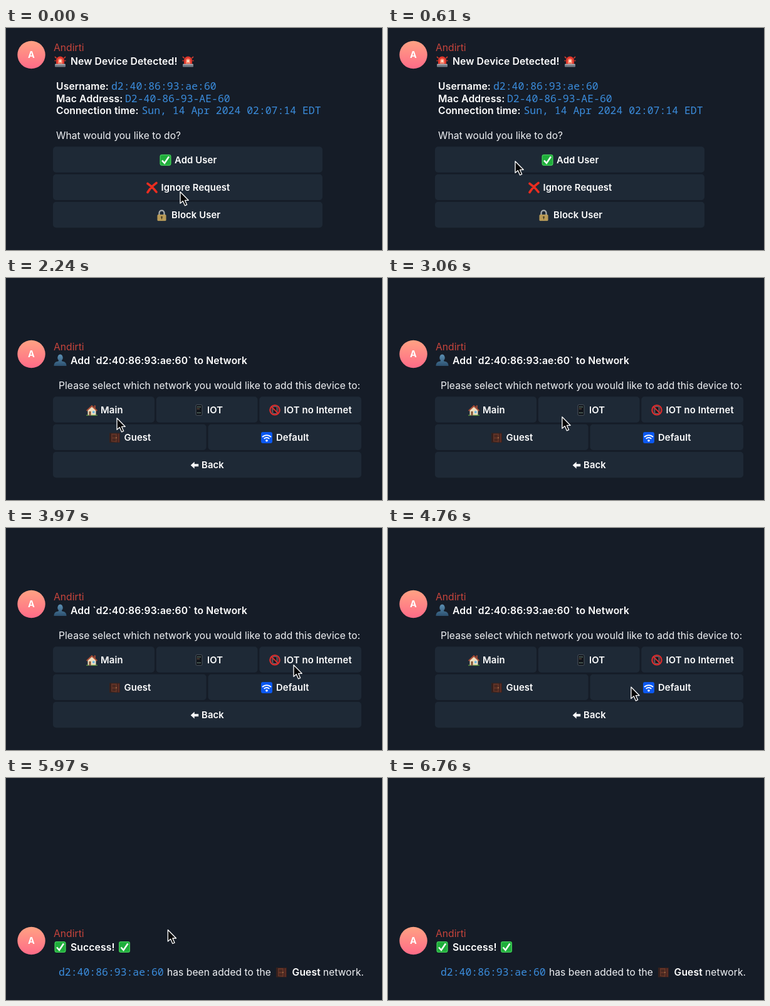
These frames come from a looping animation (600x356 px, 6.79 s). An HTML page:

```html
<!DOCTYPE html>
<html lang="en">
<head>
<meta charset="utf-8">
<title>New device prompt</title>
<style>
  html, body { margin: 0; width: 100%; height: 100%; overflow: hidden; background: #151c27; }
  svg { display: block; width: 100vw; height: 100vh; }
  text { font: 400 15.6px Inter, sans-serif; letter-spacing: .05px; fill: #f1f3f6; }
  .strong { font-weight: 600; font-size: 15.7px; letter-spacing: .13px; fill: #fff; }
  .label { font-weight: 600; font-size: 14.8px; letter-spacing: .13px; fill: #fff; }
  .code { font: 400 16.45px "Noto Sans Mono", monospace; letter-spacing: 0; fill: #3b8ddd; }
  .sender { fill: #c7443c; }
  .initial { font-weight: 700; font-size: 14.5px; fill: #fff; text-anchor: middle; }
</style>
</head>
<body>
<svg id="stage" viewBox="0 0 600 356" xmlns="http://www.w3.org/2000/svg">
  <defs>
    <linearGradient id="skin" x2="0" y2="1">
      <stop offset="0" stop-color="#ffa283"/><stop offset="1" stop-color="#ff6b88"/>
    </linearGradient>
    <linearGradient id="shade" x2="0" y2="1">
      <stop offset="0" stop-color="#5b8fb3"/><stop offset="1" stop-color="#2c506f"/>
    </linearGradient>
    <clipPath id="above"><rect width="600" height="190"/></clipPath>
    <clipPath id="reveal"><rect id="revealBox" y="180" width="600" height="176"/></clipPath>

    <!-- icons on an 18 x 18 grid -->
    <g id="siren">
      <path d="M2.500 14V7.500a6.500 6.500 0 0 1 13 0V14z" fill="#e2372c"/>
      <path d="M5.500 13V8a3.500 3.500 0 0 1 7 0v5z" fill="#ff8a70"/>
      <circle cx="9" cy="8.500" r="1.800" fill="#fff0d8"/>
      <path d="M.5 1.500l2.500 2.500M17.500 1.500l-2.500 2.500M0 8h2M16 8h2" stroke="#d8402f" stroke-width="1.700"/>
      <rect x=".5" y="13" width="17" height="5" rx="1" fill="#737a84"/>
      <path d="M1 14h16" stroke="#b9bec5"/>
    </g>
    <g id="check">
      <rect width="18" height="18" rx="3" fill="#1fae3b"/>
      <rect x=".7" y=".7" width="16.600" height="16.600" rx="2.500" fill="none" stroke="#4fd263"/>
      <path d="M3.500 9.500l4 4.500L14.500 3.500" fill="none" stroke="#fff" stroke-width="2.500"/>
    </g>
    <path id="cross" d="M2 2.500Q10 8 16 16M16 1.500Q7 8 2 16.500" fill="none" stroke="#ea2d20" stroke-width="3.600" stroke-linecap="round"/>
    <g id="lock">
      <path d="M5 9V5.500a4 4 0 0 1 8 0V9" fill="none" stroke="#a8adb0" stroke-width="2.200"/>
      <rect x="2" y="8" width="14" height="10" rx="1.500" fill="#c3a45c"/>
      <path d="M2.500 10.500h13M2.500 13h13M2.500 15.500h13" stroke="#a0834a" stroke-width=".8"/>
      <circle cx="9" cy="12" r="1.300" fill="#433923"/><path d="M9 12v3.500" stroke="#433923" stroke-width="1.200"/>
    </g>
    <g id="house">
      <path d="M2.500 8L9 2.500 15.500 8v9.500h-13z" fill="#efdfc0"/>
      <path d="M12.500 1.500H15v5l-2.500-2z" fill="#924633"/>
      <path d="M0 9.500L9 1l9 8.500-1.200 1.400L9 4 1.200 10.900z" fill="#a94c35"/>
      <path d="M4.500 11h3v6.500h-3z" fill="#81502e"/>
      <path d="M10 10.500h3.500v3.500H10z" fill="#6cb4dd"/>
      <path d="M0 17.300h4M8 17.300h10" stroke="#5d9b3b" stroke-width="1.400"/>
    </g>
    <g id="phone">
      <rect x="4" y=".5" width="10" height="17" rx="1.600" fill="#10141a" stroke="#4d555e"/>
      <path d="M6 4h6M6 13.500h6" stroke="#7e9a86" stroke-width="1.400" stroke-dasharray="1.300 .9"/>
      <path d="M6 7h4" stroke="#8d6750" stroke-width="1.400" stroke-dasharray="1.300 .9"/>
    </g>
    <g id="noPhone">
      <circle cx="9" cy="9" r="7.600" fill="#493238"/>
      <rect x="5.800" y="3.500" width="6.400" height="11" rx="1" fill="#14171d" stroke="#969098" stroke-width=".8"/>
      <circle cx="9" cy="9" r="7.800" fill="none" stroke="#df2b2c" stroke-width="2"/>
      <path d="M3.700 3.700l10.600 10.600" stroke="#df2b2c" stroke-width="2"/>
    </g>
    <g id="door">
      <path d="M0 1.500h17v15.500H0z" fill="#35201d"/>
      <path d="M3 2.500h9v14l-9-1z" fill="#653528"/>
      <path d="M4.500 4.500h5.500v4H4.500zM4.500 10.500h5.500v4H4.500z" fill="#472820"/>
      <path d="M13 2.500h3v14h-3z" fill="#5a2c24"/><circle cx="11" cy="9.300" r=".8" fill="#cfa05e"/>
    </g>
    <g id="wifi">
      <rect width="18" height="18" rx="3" fill="#0b58f0"/>
      <path d="M2 8a9.900 9.900 0 0 1 14 0M4.700 10.800a6.100 6.100 0 0 1 8.600 0" fill="none" stroke="#fff" stroke-width="1.900"/>
      <circle cx="9" cy="13.800" r="1.800" fill="#fff"/>
    </g>
    <path id="person" fill="url(#shade)" d="M9.500 0a4.600 5.300 0 0 1 2.600 9.300v1.500c4 1 7.400 2 7.400 7.700h-20c0-5.700 3.400-6.700 7.400-7.700V9.300A4.600 5.300 0 0 1 9.500 0z"/>
    <path id="arrow" d="M0 6l6-5.500V4h6.500v4H6v3.500z" fill="#fff"/>
  </defs>
  <rect width="600" height="356" fill="#151c27"/>
  <g id="content"></g>
  <path id="cursor" d="M0 .8V19.300L4.300 15.500 7.500 22.800 10.700 21.400 7.500 14.300H13.200Z" fill="#050506" stroke="#fff" stroke-width="1.300" stroke-linejoin="round"/>
</svg>
<script>
const LOOP = 6790;
const SHIFT = 79;
const MAC = "d2:40:86:93:ae:60";

const byId = id => document.getElementById(id);
const text = (x, y, value, kind = "") => `<text x="${x}" y="${y}" class="${kind}">${value}</text>`;
const icon = (name, x, y) => `<use href="#${name}" x="${x}" y="${y}"/>`;
const box = (x, y, w, h = 41.5) => `<rect x="${x}" y="${y}" width="${w}" height="${h}" rx="5" fill="#1e2936"/>`;

function button(x, row, width, name, iconX, label, labelX) {
  const y = 190.3 + row * 44.2;
  return box(x, y, width) + icon(name, iconX, y + (name === "arrow" ? 15.5 : 12.5)) +
    text(labelX, y + 26.7, label, "label");
}

const header = y => `<circle cx="40.500" cy="${y}" r="22.200" fill="url(#skin)"/>` +
  text(40.5, y + 5.3, "A", "initial") + text(76, y - 6, "Andirti", "sender");

const alertText = icon("siren", 77.5, 44.5) + text(103, 59.3, "New Device Detected!", "strong") +
  icon("siren", 281.5, 44.5) +
  text(80, 98.7, "Username:", "strong") + text(168, 98.7, MAC, "code") +
  text(80, 118.5, "Mac Address:", "strong") +
  text(190, 118.5, MAC.toUpperCase().replaceAll(":", "-"), "code") +
  text(80, 138, "Connection time:", "strong") +
  text(216.5, 138, "Sun, 14 Apr 2024 02:07:14 EDT", "code") +
  text(80, 177.6, "What would you like to do?");

const alertButtons = button(75, 0, 430, "check", 245.5, "Add User", 269) +
  button(75, 1, 430, "cross", 224, "Ignore Request", 247.5) +
  button(75, 2, 430, "lock", 239.5, "Block User", 264);

const chooseText = icon("person", 77, 122.5) + text(103, 138.3, `Add \`${MAC}\` to Network`, "strong") +
  text(84, 177.6, "Please select which network you would like to add this device to:");

const chooseButtons = button(75, 0, 162, "house", 128, "Main", 151) +
  button(239.7, 0, 161.8, "phone", 299, "IOT", 321) +
  button(404.3, 0, 162.7, "noPhone", 420, "IOT no Internet", 443.5) +
  button(75, 1, 244.7, "door", 165, "Guest", 188.5) +
  button(322.5, 1, 244.5, "wifi", 407, "Default", 431) +
  button(75, 2, 492, "arrow", 294.7, "Back", 312);

const done = `<rect y="239" width="600" height="117" fill="#151c27"/>` + header(261) +
  icon("check", 77.5, 262) + text(103, 277.3, "Success!", "strong") + icon("check", 180, 262) +
  text(84, 317, MAC, "code") + text(257, 317, "has been added to the") +
  icon("door", 431, 302.5) + text(456.5, 317, "Guest", "strong") + text(506, 317, "network.");

byId("content").innerHTML = `
  <g id="prompt">
    <g id="header">${header(43)}</g>
    <g clip-path="url(#above)"><g id="alertText">${alertText}</g></g>
    <g id="chooseText">${chooseText}</g>
    <g id="alertButtons">${alertButtons}</g>
    <g id="chooseButtons" clip-path="url(#reveal)">${chooseButtons}</g>
  </g>
  <g id="done">${done}</g>`;

// Pointer way-points: time, x, y
const path = [
  [0, 278, 262], [610, 203, 213], [1000, 248, 218], [1450, 269, 217], [1850, 215, 222],
  [2240, 177, 224], [2700, 198, 222], [3300, 335, 222], [3970, 459, 219], [4500, 445, 256],
  [5000, 330, 251], [5550, 257, 241], [6050, 259, 245], [6300, 264, 268], [6680, 282, 365], [LOOP, 284, 380]
];

function slope(i, axis) {
  const a = path[Math.max(i - 1, 0)], b = path[Math.min(i + 1, path.length - 1)];
  const here = path[i][axis];
  if ((here - a[axis]) * (b[axis] - here) <= 0) return 0;
  return (b[axis] - a[axis]) / (b[0] - a[0]);
}

function pointer(t, axis) {
  const i = Math.max(path.findIndex(p => p[0] > t) - 1, 0);
  const a = path[i], b = path[i + 1], span = b[0] - a[0];
  const u = (t - a[0]) / span, u2 = u * u, u3 = u2 * u;
  return a[axis] * (2 * u3 - 3 * u2 + 1) + b[axis] * (3 * u2 - 2 * u3) +
    span * (slope(i, axis) * (u3 - 2 * u2 + u) + slope(i + 1, axis) * (u3 - u2));
}

function ease(t, start, duration = 200) {
  const u = Math.min(Math.max((t - start) / duration, 0), 1);
  return u < 0.5 ? 2 * u * u : 1 - 2 * (1 - u) ** 2;
}

const set = (id, name, value) => byId(id).setAttribute(name, value);
const move = (id, x, y) => set(id, "transform", `translate(${x} ${y})`);

function draw(t) {
  const open = ease(t, 1387), finish = ease(t, 5480);
  move("header", 0, SHIFT * open);
  move("alertText", 0, SHIFT * open);
  move("chooseText", 0, SHIFT * (open - 1));
  set("alertText", "opacity", 1 - open);
  set("chooseText", "opacity", open);
  set("alertButtons", "visibility", open ? "hidden" : "visible");
  set("chooseButtons", "visibility", open ? "visible" : "hidden");
  set("revealBox", "width", 505 + 62 * open);
  set("prompt", "opacity", 1 - finish);
  set("done", "opacity", finish);
  move("cursor", pointer(t, 1), pointer(t, 2));
}

const begin = performance.now();
function tick() {
  draw((performance.now() - begin) % LOOP);
  requestAnimationFrame(tick);
}
tick();
</script>
</body>
</html>
```
